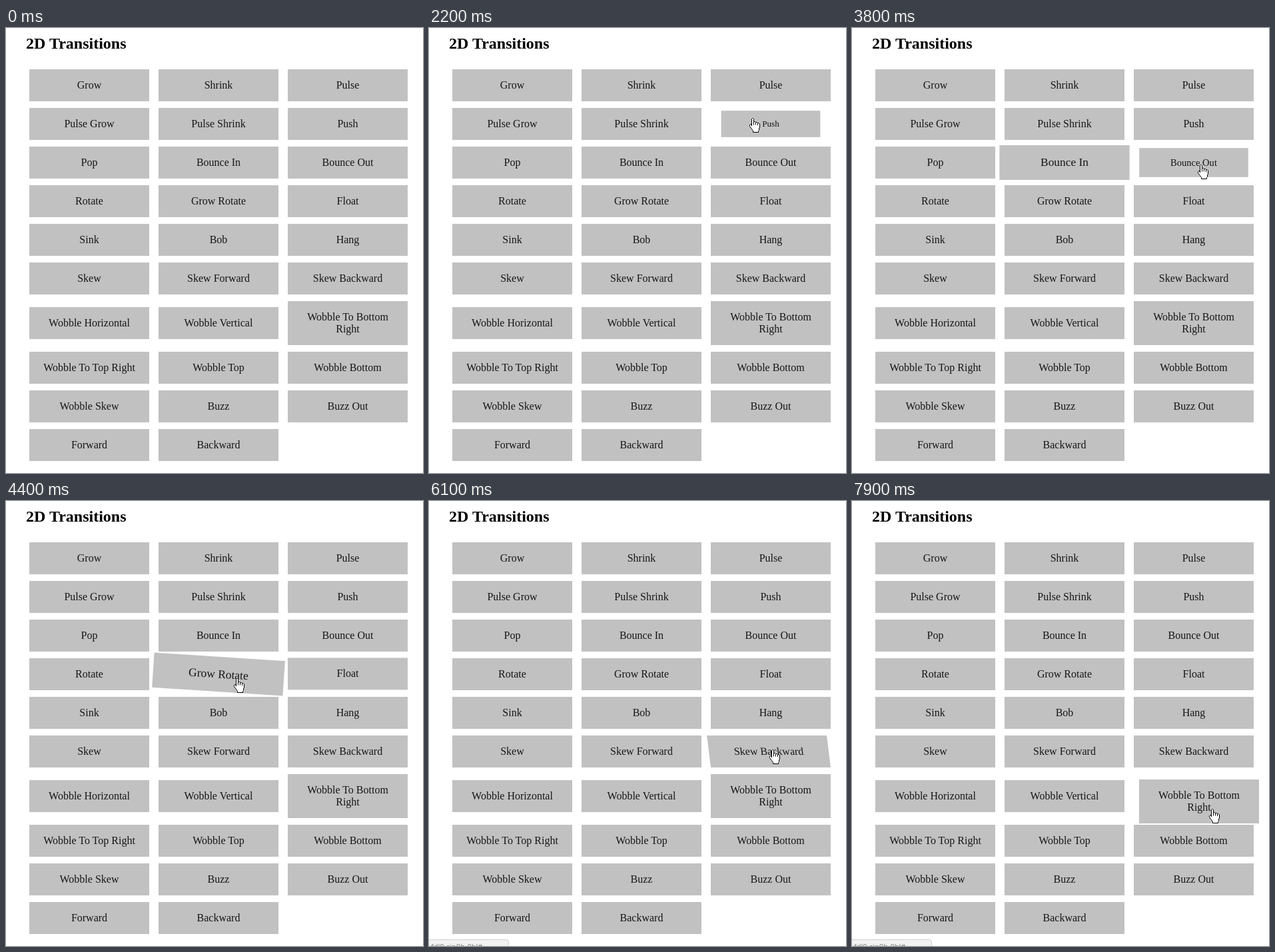
An HTML page that plays this animation: 626 px wide and 668 px high, repeating every 8000 ms.

```html
<!DOCTYPE html>
<html lang="en">
<head>
<meta charset="utf-8">
<title>2D Transitions</title>
<style>
  html, body { margin: 0; width: 100%; height: 100%; overflow: hidden; background: #fff; }
  body { position: relative; font: 16px/18px "Liberation Serif", "Times New Roman", serif; color: #000; }
  h2 { position: absolute; left: 30px; top: 9px; margin: 0; font-size: 24px; line-height: 28px; white-space: nowrap; }
  .tile {
    position: absolute; box-sizing: border-box; width: 180px; padding: 15px;
    background: #c1c1c1; color: #161616; text-align: center;
  }
  #status {
    position: absolute; left: -1px; top: 658px; width: 119px; height: 22px; opacity: 0;
    background: #f2f2f2; border: 1px solid #d0d0d0; border-top-right-radius: 4px;
    font: 11px/20px "Open Sans", sans-serif; color: #777; text-indent: 3px; white-space: nowrap;
  }
  #hand { position: absolute; left: -6px; top: 0; visibility: hidden; }
</style>
</head>
<body>
<h2>2D Transitions</h2>
<div id="tiles"></div>
<div id="status">fdl0-sin0b-0bl#</div>
<svg id="hand" width="18" height="23" stroke="#000" stroke-linejoin="round">
  <path fill="#fff" d="M4.5 12V1.5l1-1h1l1 1v4h2l1 1h2l1 1h1.5l1.5 1.5V14l-1 2v2.5l-1 1v2h-8v-2l-2-3-3-4v-2l1-1h1z"/>
  <path fill="none" d="M7.5 5.5v5M10.5 6.5v4M13.5 7.5v3.5"/>
</svg>
<script>
const LOOP = 8000, STEP = 100, START = 900;
const GAP = 30; // time the pointer spends between two tiles

// Easing
function bezier(x1, y1, x2, y2) {
  const at = (a, b, s) => 3 * (1 - s) * (1 - s) * s * a + 3 * (1 - s) * s * s * b + s * s * s;
  return x => {
    if (x <= 0) return 0;
    if (x >= 1) return 1;
    let lo = 0, hi = 1;
    for (let i = 0; i < 24; i++) {
      const mid = (lo + hi) / 2;
      if (at(x1, x2, mid) < x) lo = mid; else hi = mid;
    }
    return at(y1, y2, lo);
  };
}
const linear = x => x;
const ease = bezier(.25, .1, .25, 1);
const easeOut = bezier(0, 0, .58, 1);
const easeInOut = bezier(.42, 0, .58, 1);
const bounce = bezier(.47, 2.02, .31, -.36);

// Transition: runs in on enter, back on leave
function shift(draw, ms = 300, curve = ease, back = ease) {
  return (t, enter, leave) => {
    const p = curve((Math.min(t, leave) - enter) / ms) * (1 - back((t - leave) / ms));
    return p ? draw(p) : 'none';
  };
}
// Animation: plays only while hovered
const play = (draw, track) => (t, enter, leave) => t < leave ? draw(track(t - enter)) : 'none';

// Evenly spaced stops over ms
function stops(values, ms, curve = linear, loop = false) {
  const n = values.length - 1;
  return t => {
    const u = (loop ? t % ms / ms : Math.min(t / ms, 1)) * n;
    const i = Math.min(Math.floor(u), n - 1);
    return values[i] + (values[i + 1] - values[i]) * curve(u - i);
  };
}

const scale = v => `scale(${v})`;
const moveX = v => `translateX(${v}px)`;
const moveY = v => `translateY(${v}px)`;
const moveXY = v => `translate(${v}px, ${v}px)`;
const scaleBy = d => p => scale(1 + d * p);
const turn = p => `rotate(${4 * p}deg)`;
const skew = deg => shift(p => `skewX(${deg * p}deg)`);
const slide = d => shift(p => moveY(d * p), 300, easeOut, easeOut);
const pulse = (peak, ms, loop) => play(scale, stops([1, peak, 1], ms, linear, loop));

const wobble = stops([0, 8, -6, 4, -2, 1, 0], 1000, easeInOut);
const sway = stops([8, 4, 8], 1500, easeInOut, true);
const hover = t => t < 300 ? 8 * easeOut(t / 300) : sway(t - 300);

// Tiles in the order the pointer visits them, row by row in alternating directions
const visits = [
  ['Grow', 950, shift(scaleBy(.1))],
  ['Shrink', 1417, shift(scaleBy(-.1))],
  ['Pulse', 1762, play(scale, stops([1, 1.1, 1, .9, 1], 1000, linear, true))],
  ['Push', 2030, pulse(.8, 300, false)],
  ['Pulse Shrink', 2410, pulse(.9, 600, true)],
  ['Pulse Grow', 2700, pulse(1.1, 600, true)],
  ['Pop', 3167, pulse(1.2, 300, false)],
  ['Bounce In', 3390, shift(scaleBy(.2), 500, bounce)],
  ['Bounce Out', 3742, shift(scaleBy(-.2), 500, bounce)],
  ['Float', 3950, slide(-8)],
  ['Grow Rotate', 4200, shift(p => scaleBy(.1)(p) + turn(p))],
  ['Rotate', 4820, shift(turn)],
  ['Sink', 5170, slide(8)],
  ['Bob', 5500, play(v => moveY(-v), hover)],
  ['Hang', 5715, play(moveY, hover)],
  ['Skew Backward', 5975, skew(10)],
  ['Skew Forward', 6400, skew(-10)],
  ['Skew', 6680, skew(-10)],
  ['Wobble Horizontal', 7120, play(moveX, wobble)],
  ['Wobble Vertical', 7480, play(moveY, wobble)],
  ['Wobble To Bottom Right', 7734, play(moveXY, wobble)]
].map(([name, enter, effect], i, all) =>
  ({ name, enter, effect, leave: i + 1 < all.length ? all[i + 1][1] - GAP : LOOP }));

const names = [
  'Grow', 'Shrink', 'Pulse', 'Pulse Grow', 'Pulse Shrink', 'Push',
  'Pop', 'Bounce In', 'Bounce Out', 'Rotate', 'Grow Rotate', 'Float',
  'Sink', 'Bob', 'Hang', 'Skew', 'Skew Forward', 'Skew Backward',
  'Wobble Horizontal', 'Wobble Vertical', 'Wobble To Bottom Right',
  'Wobble To Top Right', 'Wobble Top', 'Wobble Bottom',
  'Wobble Skew', 'Buzz', 'Buzz Out', 'Forward', 'Backward'
];

// Row seven holds a two-line tile, so it is 18px taller
const centre = i => {
  const row = Math.floor(i / 3);
  return [125 + 194 * (i % 3), 86 + 58 * row + 9 * Math.max(0, Math.min(row - 5, 2))];
};

names.forEach((name, i) => {
  const el = document.createElement('div'), [x, y] = centre(i);
  const height = name === 'Wobble To Bottom Right' ? 66 : 48;
  el.className = 'tile';
  el.textContent = name;
  el.style.left = x - 90 + 'px';
  el.style.top = y - height / 2 + 'px';
  if (name.startsWith('Skew ')) el.style.transformOrigin = '0 100%';
  document.getElementById('tiles').append(el);
  const visit = visits.find(v => v.name === name);
  if (visit) Object.assign(visit, { el, x, y });
});

// Pointer: halfway between two tiles when it crosses over, plus a few resting places
const path = visits.slice(1).map((b, i) => {
  const a = visits[i];
  return [b.enter - GAP / 2, (a.x + b.x) / 2, (a.y + b.y) / 2 + 4];
}).concat([
  [START, 101, 84], [1500, 312, 89], [2900, 129, 147], [3800, 524, 205],
  [5000, 151, 275], [6100, 516, 373], [7900, 541, 462]
]).sort((a, b) => a[0] - b[0]);

function slope(i, k) {
  const a = path[Math.max(i - 1, 0)], b = path[Math.min(i + 1, path.length - 1)];
  return (b[k] - a[k]) / (b[0] - a[0]);
}
function pointer(t, k) {
  let i = 0;
  while (i < path.length - 2 && path[i + 1][0] <= t) i++;
  const a = path[i], b = path[i + 1], d = b[0] - a[0], u = (t - a[0]) / d, v = 1 - u;
  return Math.round(v * v * (1 + 2 * u) * a[k] + u * u * (1 + 2 * v) * b[k]
    + d * u * v * (v * slope(i, k) - u * slope(i + 1, k)));
}

const hand = document.getElementById('hand');
const bar = document.getElementById('status');

function draw(t) {
  for (const { el, enter, leave, effect } of visits)
    el.style.transform = t <= enter ? 'none' : effect(t, enter, leave);
  hand.style.visibility = t < START ? 'hidden' : 'visible';
  if (t >= START) hand.style.transform = moveX(pointer(t, 1)) + moveY(pointer(t, 2));
  bar.style.opacity = Math.max(0, Math.min(1, (t - 4900) / 300));
}

const start = performance.now();
let shown = -1;
function tick() {
  const t = Math.floor((performance.now() - start) % LOOP / STEP) * STEP;
  if (t !== shown) draw(shown = t);
  requestAnimationFrame(tick);
}
tick();
</script>
</body>
</html>
```
